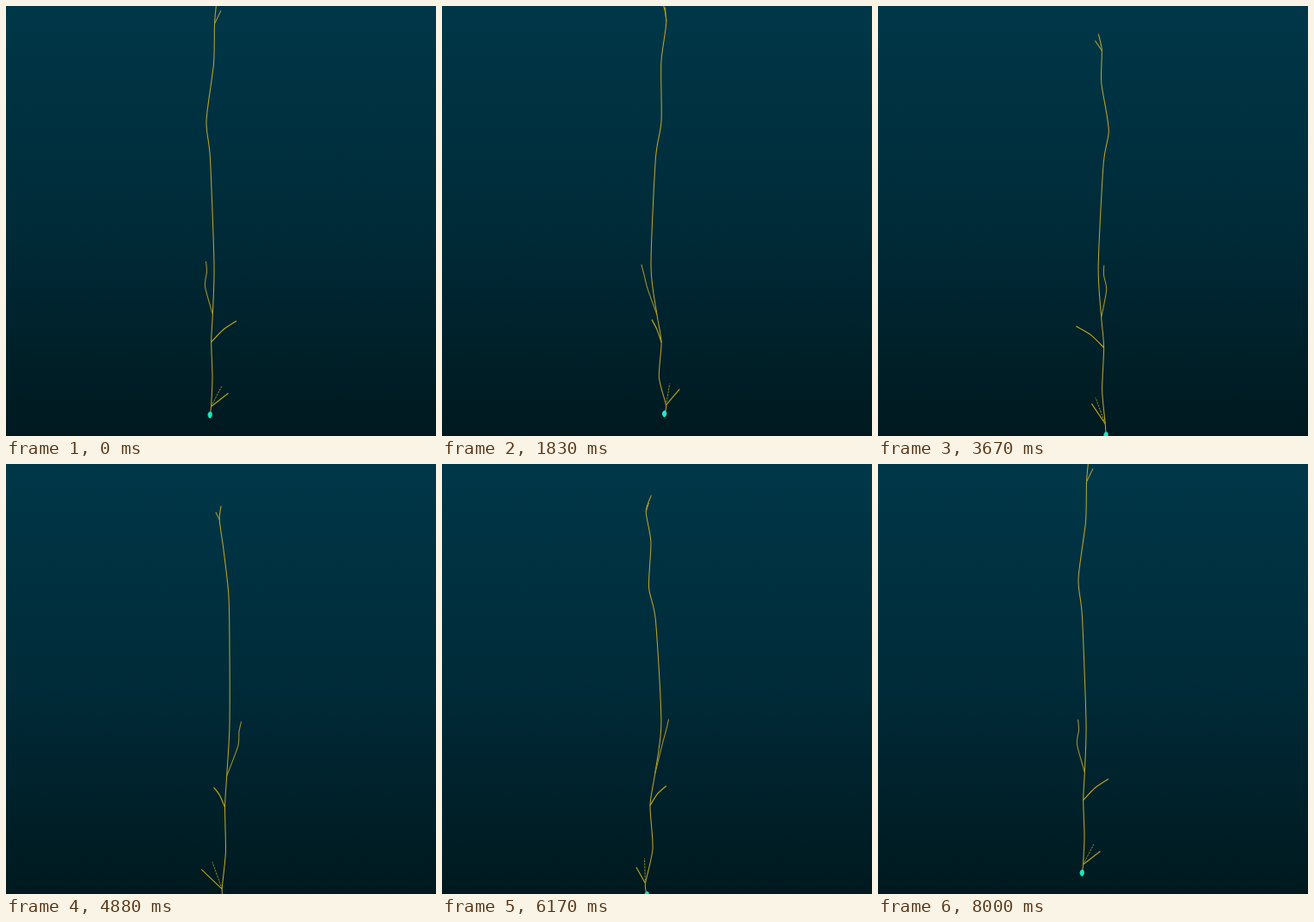
Recreate the animation shown at these times as an HTML page with a canvas. Size 500 by 500 pixels, loop 8.04 s.

```html
<!DOCTYPE html>
<html lang="en">
<head>
<meta charset="utf-8">
<title>Rotating neuron</title>
<style>
html, body { margin: 0; width: 100%; height: 100%; overflow: hidden; background: #00191f; }
canvas { display: block; width: 500px; height: 500px; }
</style>
</head>
<body>
<canvas id="stage" width="500" height="500"></canvas>
<script>
const ctx = document.getElementById('stage').getContext('2d');
const SIZE = 500, LOOP = 8040, STEPS = 192, FPS = 24;

// Key points in space: x and z from the turning axis, y down the stage
const point = (x, z, y) => ({ x, z, y });

const topFork = point(-7.5, 11.9, 39);
const upFork = point(-9.7, 1.3, 360.5);
const midFork = point(-11.3, 6.6, 394.5);
const lowFork = point(-11.5, 12.1, 477.5);
const soma = point(-12.8, 10.3, 489.5);

const axon = [
  point(-5, 6, 16.5), topFork, point(-8.5, 6, 80), point(-17, 7.3, 139.5),
  point(-12.6, 0, 180), point(-8, -6, 302),
  upFork, midFork, point(-10, 3.7, 440.5), lowFork, soma
];
const twig = [topFork, point(0, 9.6, 26)];
const upBranch = [
  upFork, point(-18.5, -8.5, 328), point(-16.5, -13, 311), point(-17.5, -16, 299)
];
const midBranch = [midFork, point(2.5, -0.5, 380), point(18, -8.5, 370)];
const lowBranch = [lowFork, point(8.5, 25.5, 458)];
const dashedBranch = [lowFork, point(1, 14.8, 450)];

const sky = ctx.createLinearGradient(0, 0, 0, SIZE);
['#003748', '#002b39', '#00191f'].forEach((color, i) => sky.addColorStop(i / 2, color));

// Turn around the upright axis; both ends swing down as they come round
function project({ x, z, y }, angle) {
  const c = Math.cos(angle), s = Math.sin(angle);
  const swing = 18 * ((y - 280) / 230) ** 2;
  const depth = z * c - x * s;
  return [SIZE / 2 + x * c + z * s, y - swing * (c + s) + 0.12 * depth];
}

// Smooth curve through every point
function stroke(path, angle, color, width = 1.05, dash = []) {
  const pts = path.map(p => project(p, angle));
  const at = i => pts[Math.max(0, Math.min(pts.length - 1, i))];
  ctx.beginPath();
  ctx.moveTo(...pts[0]);
  for (let i = 0; i < pts.length - 1; i++) {
    const [a, b, c, d] = [at(i - 1), at(i), at(i + 1), at(i + 2)];
    ctx.bezierCurveTo(
      b[0] + (c[0] - a[0]) / 8, b[1] + (c[1] - a[1]) / 8,
      c[0] - (d[0] - b[0]) / 8, c[1] - (d[1] - b[1]) / 8,
      ...c);
  }
  ctx.setLineDash(dash);
  ctx.strokeStyle = color;
  ctx.lineWidth = width;
  ctx.stroke();
}

function drawSoma(angle) {
  const [x, y] = project(soma, angle);
  const glow = (1 + Math.sin(angle)) / 2;
  ctx.fillStyle = `rgb(${10 + 25 * glow}, 232, ${175 + 30 * glow})`;
  ctx.beginPath();
  ctx.moveTo(x + 0.5, y - 4.2);
  ctx.bezierCurveTo(x + 3.8, y - 3, x + 3.2, y + 2, x, y + 4);
  ctx.bezierCurveTo(x - 3.4, y + 2, x - 3.8, y - 3, x + 0.5, y - 4.2);
  ctx.fill();
}

function draw(time) {
  // Steps change on whole hundredths of a second
  const tick = Math.floor((time % LOOP) / 10);
  const step = Math.floor((tick + 0.999) * FPS / 100);
  const angle = step / STEPS * Math.PI * 2;
  ctx.fillStyle = sky;
  ctx.fillRect(0, 0, SIZE, SIZE);
  ctx.lineJoin = 'round';
  stroke(axon, angle, '#b9a52c');
  stroke(twig, angle, '#a99a2c');
  stroke(upBranch, angle, '#a3952a');
  stroke(midBranch, angle, '#b9a81f', 1.2);
  stroke(lowBranch, angle, '#b5a61c', 1.15);
  stroke(dashedBranch, angle, '#8f8a22', 1, [2.5, 1]);
  drawSoma(angle);
}

const start = performance.now();
function loop() {
  draw(performance.now() - start);
  requestAnimationFrame(loop);
}
loop();
</script>
</body>
</html>
```
